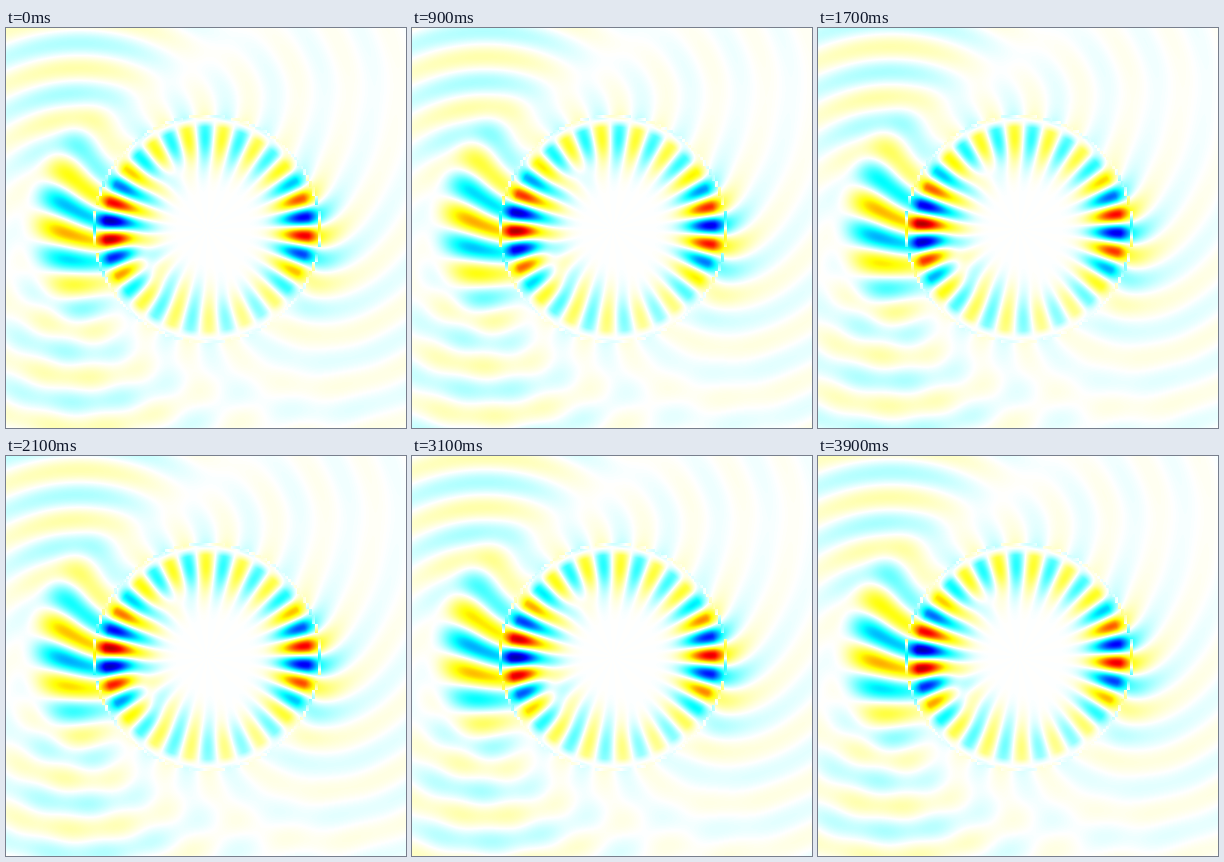
These frames come from a looping animation (400x400 px, 4 s). A matplotlib script:

```python
import numpy as np
import matplotlib.pyplot as plt
from matplotlib.animation import FuncAnimation
from matplotlib.colors import LinearSegmentedColormap

SIZE, FRAMES, STEP_MS = 400, 40, 100
CENTRE, RADIUS = 201.0, 113.0
K = 2 * np.pi / 50          # wavenumber outside the disk
M_HOT, M_RING = 16, 17      # angular orders of the hot spots and the ring mode
SPREAD = 2.7                # spread of angular orders in a hot spot


def hankel(m, x):
    """Outgoing Hankel function of integer order, by direct quadrature."""
    n = 800
    theta = (np.arange(n) + 0.5) * np.pi / n
    wave = np.exp(1j * (x[:, None] * np.sin(theta) - m * theta)).mean(axis=1)
    t = (np.arange(600) + 0.5) * 4 / 600
    decay = np.exp(-x[:, None] * np.sinh(t))
    tail = (decay * (np.exp(m * t) + (-1) ** m * np.exp(-m * t))).sum(axis=1)
    return wave - 1j * tail * (4 / 600) / np.pi


def phasor(degrees):
    return np.exp(1j * np.radians(degrees))


def bump(d, inner, outer):
    return np.exp(-(d / np.where(d < 0, inner, outer)) ** 2)


def spot(angle, order, spread):
    return np.exp(-(angle * spread) ** 2 / 2 + 1j * order * angle)


def ring_profile(r):
    """Radial shape of the ring mode, with a node just inside the rim."""
    return bump(r - 92, 23, 26) * np.clip((109 - r) / 7, -1, 1)


def outgoing(m, r):
    """Outgoing radial wave, equal to one on the rim."""
    s = np.linspace(RADIUS, 300, 220)
    h = hankel(m, K * s)
    h = h / h[0]
    return np.interp(r, s, h.real) + 1j * np.interp(r, s, h.imag)


def beam(x, y):
    """Focused beam travelling upwards past the left rim."""
    width = 0.43
    total, weight = 0, 0
    for tilt in np.linspace(-1.2, 1.2, 49):
        w = np.exp(-(tilt / width) ** 2 / 2)
        total = total + w * np.exp(
            1j * K * ((x - 75) * np.sin(tilt) + (CENTRE - y) * np.cos(tilt)))
        weight += w
    return total / weight


def field():
    x, y = np.meshgrid(np.arange(SIZE) + 0.5, np.arange(SIZE) + 0.5)
    dx, dy = x - CENTRE, y - CENTRE
    r = np.hypot(dx, dy)
    right = np.arctan2(dy, dx)       # grows clockwise on screen
    left = np.arctan2(-dy, -dx)
    gap = np.maximum(r - RADIUS, 0)

    left_spot = 0.64 * phasor(99) * spot(left, M_HOT, SPREAD)
    right_spot = 0.64 * phasor(-64) * spot(right, M_HOT, SPREAD)
    # the ring mode is strongest at the upper left
    ring = (0.23 * (1 + 0.35 * np.cos(left - np.pi / 4))
            * phasor(-72) * np.exp(1j * M_RING * right))

    core = (bump(r - 99, 22, 27) * left_spot
            + bump(r - 99, 23, 20) * right_spot
            + ring_profile(r) * ring
            + 0.17 * bump(r - 66, 18, 18) * phasor(-191) * spot(left, 13, 1.1))

    # outside: radiation from the right spot and the ring, near field, beam
    orders = np.arange(7, 26)
    weights = np.exp(-((orders - M_HOT) / SPREAD) ** 2 / 2)
    weights /= weights.sum()
    radiated = sum(w * outgoing(m, r) * np.exp(1j * m * right)
                   for m, w in zip(orders, weights))
    near = np.exp(-(gap / 55) ** 4) * phasor(-2.2 * gap)
    outer = (0.64 * phasor(-64) * radiated * bump(np.float64(RADIUS - 99), 23, 20)
             * (0.4 + 0.6 * np.exp(-(gap / 28) ** 2))
             + ring_profile(np.float64(RADIUS)) * ring * outgoing(M_RING, r)
             + left_spot * bump(np.float64(RADIUS - 99), 22, 27) * near
             + 0.2 * phasor(-50) * beam(x, y) * (1 - np.exp(-(gap / 48) ** 2)))

    u = np.where(r < RADIUS, core, outer)

    # broken rim on a coarse grid
    cell = 3
    qx = (np.floor(x / cell) + 0.5) * cell - CENTRE
    qy = (np.floor(y / cell) + 0.5) * cell - CENTRE
    on_rim = np.abs(np.hypot(qx, qy) - RADIUS) < 1.1
    return np.where(on_rim, 0.8 * phasor(60) * u, u)


cmap = LinearSegmentedColormap.from_list("wave", [
    (0.0, (0, 0, 0.5)), (0.12, (0, 0, 1)), (0.33, (0, 1, 1)),
    (0.5, (1, 1, 1)),
    (0.67, (1, 1, 0)), (0.88, (1, 0, 0)), (1.0, (0.5, 0, 0))], N=512)

wave = field()
fig = plt.figure(figsize=(4, 4), dpi=100)
ax = fig.add_axes([0, 0, 1, 1])
ax.axis("off")
image = ax.imshow(wave.real, cmap=cmap, vmin=-1, vmax=1,
                  interpolation="nearest", aspect="auto")


def update(i):
    image.set_data((wave * np.exp(-2j * np.pi * i / FRAMES)).real)
    return (image,)


anim = FuncAnimation(fig, update, frames=FRAMES, interval=STEP_MS,
                     repeat=True, repeat_delay=0)
plt.show()
```
